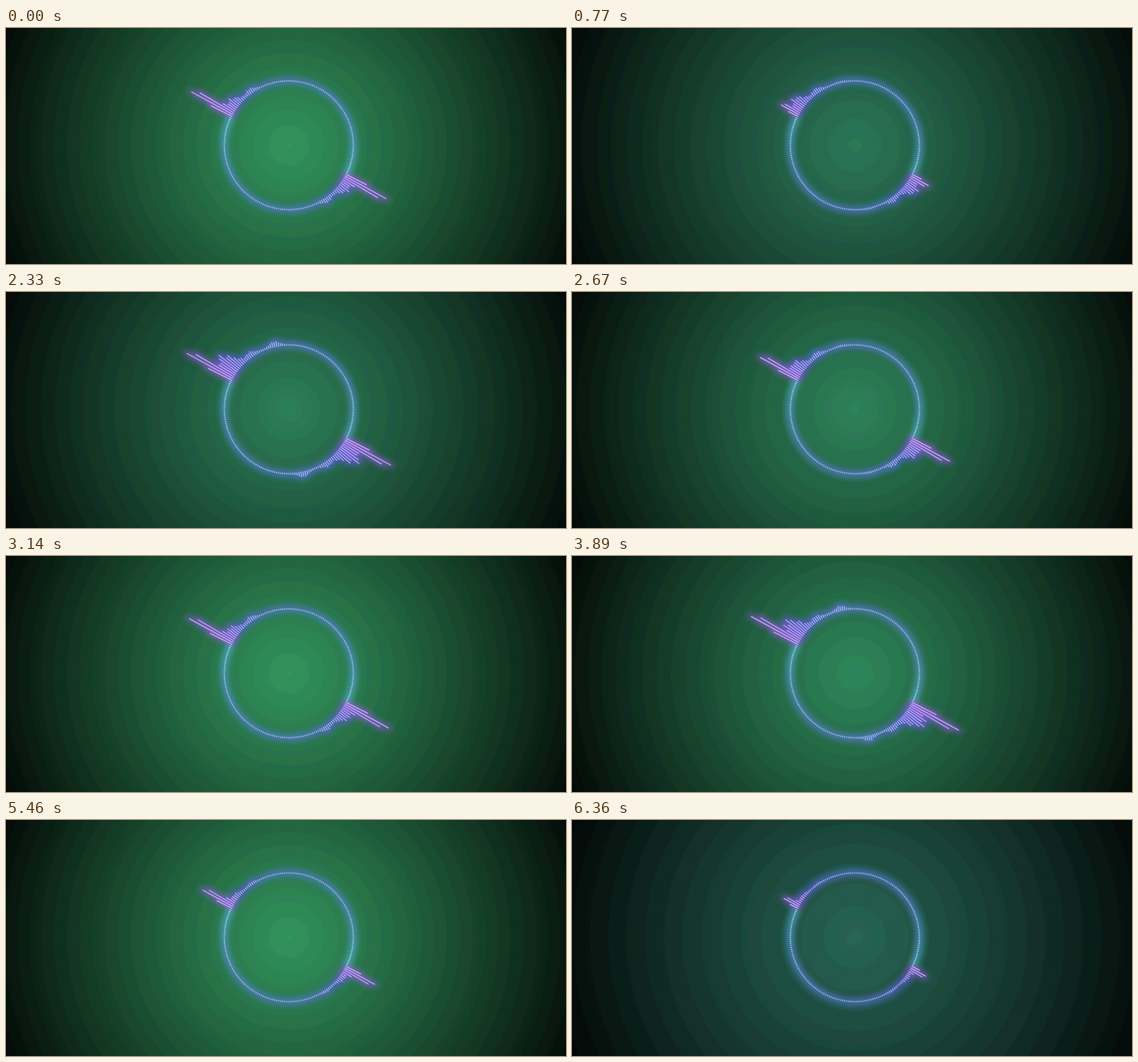
An HTML page with a canvas that plays this animation: 786 px wide and 332 px high, repeating every 6.43 s.

```html
<!DOCTYPE html>
<html lang="en">
<head>
<meta charset="utf-8">
<title>Circular spectrum</title>
<style>
  html, body { margin: 0; width: 100%; height: 100%; overflow: hidden; background: #020806; }
  canvas { position: absolute; left: 0; top: 0; }
  #glow { filter: blur(4.5px); }
</style>
</head>
<body>
<canvas id="back" width="786" height="332"></canvas>
<canvas id="glow" width="786" height="332"></canvas>
<canvas id="bars" width="786" height="332"></canvas>
<script>
const W = 786, H = 332, CX = 397, CY = 165, LOOP = 6430, BEAT = LOOP / 9;
const HALF = 100, RADIUS = 91, START = 207 * Math.PI / 180;
const [back, glow, bars] = ['back', 'glow', 'bars']
  .map(id => document.getElementById(id).getContext('2d'));

// Moods of the music, eased into one another
const KEYS = [
  { at: 0, bass: 66, mid: 15, light: 1 },
  { at: 770, bass: 26, mid: 18, light: .38 },
  { at: 2330, bass: 72, mid: 33, light: .55 },
  { at: 3140, bass: 70, mid: 15, light: 1 },
  { at: 3890, bass: 75, mid: 32, light: .72 },
  { at: 5460, bass: 48, mid: 7, light: 1 },
  { at: 6360, bass: 23, mid: 4, light: 0 }
];

const mix = (a, b, u) => a + (b - a) * u;
const bump = (i, at, width) => Math.exp(-(((i - at) / width) ** 2));

function moodAt(time) {
  const k = KEYS.findLastIndex(key => key.at <= time);
  const a = KEYS[k], b = KEYS[k + 1] || { ...KEYS[0], at: LOOP };
  // About 15 pictures a second, counted from each key
  const steps = Math.round((b.at - a.at) / 68);
  const u = Math.floor((time - a.at) / (b.at - a.at) * steps) / steps;
  const t = mix(a.at, b.at, u);
  const swell = Math.sin(Math.PI * u) * (Math.exp(-3 * (t % BEAT) / BEAT) - .4);
  return {
    t,
    bass: mix(a.bass, b.bass, u) * (1 + .5 * swell),
    mid: mix(a.mid, b.mid, u) * (1 + swell),
    light: Math.min(1, Math.max(0, mix(a.light, b.light, u) + .4 * swell))
  };
}

function barLength(i, { t, bass, mid }) {
  const jag = .85 + .15 * Math.sin(i * 2.4 + t * .011);
  const low = bass * bump(i, 1.3, 1.45);
  const middle = mid * bump(i, 5.5, 4) * jag;
  const high = Math.min(6, mid * .4) * bump(i, 15.5, 3) + Math.max(0, mid - 15) * .35 * bump(i, 28, 3);
  return Math.max(low, middle) + high * jag + mid * .1 * Math.exp(-i / 15);
}

function drawBack(light) {
  const rgb = [mix(39, 50, light), mix(101, 148, light), mix(84, 93, light)];
  back.fillStyle = '#030d08';
  back.fillRect(0, 0, W, H);
  for (let r = 430; r > 0; r -= 2) {
    const fall = 1 - (r / 460) ** 1.1;
    const [red, green, blue] = rgb.map((c, n) => {
      const band = 5 + n % 2;
      return Math.round(c * fall / band) * band;
    });
    back.fillStyle = `rgb(${Math.max(3, red)},${green},${blue})`;
    back.beginPath();
    back.arc(CX, CY, r, 0, 7);
    back.fill();
  }
}

function ray(ctx, angle, from, to, width, color) {
  const c = Math.cos(angle), s = Math.sin(angle);
  ctx.strokeStyle = color;
  ctx.lineWidth = width;
  ctx.beginPath();
  ctx.moveTo(CX + c * from, CY + s * from);
  ctx.lineTo(CX + c * to, CY + s * to);
  ctx.stroke();
}

function draw(time) {
  const mood = moodAt(time);
  drawBack(mood.light);
  glow.clearRect(0, 0, W, H);
  bars.clearRect(0, 0, W, H);

  for (let i = 0; i < HALF; i++) {
    const len = barLength(i, mood);
    const hue = 226 + 44 * Math.exp(-i / 9) - 32 * (i / HALF) ** 4;
    for (const turn of [0, Math.PI]) {
      const angle = START + turn + i * Math.PI / HALF;
      ray(glow, angle, 86, RADIUS + 5 + len, 3 + Math.min(4, len / 10), `hsla(${hue},66%,61%,.7)`);
      ray(bars, angle, 89.5, RADIUS + .5 + len, 1.3, `hsl(${hue},80%,82%)`);
    }
  }
}

function tick() {
  draw(performance.now() % LOOP);
  requestAnimationFrame(tick);
}
tick();
</script>
</body>
</html>
```
